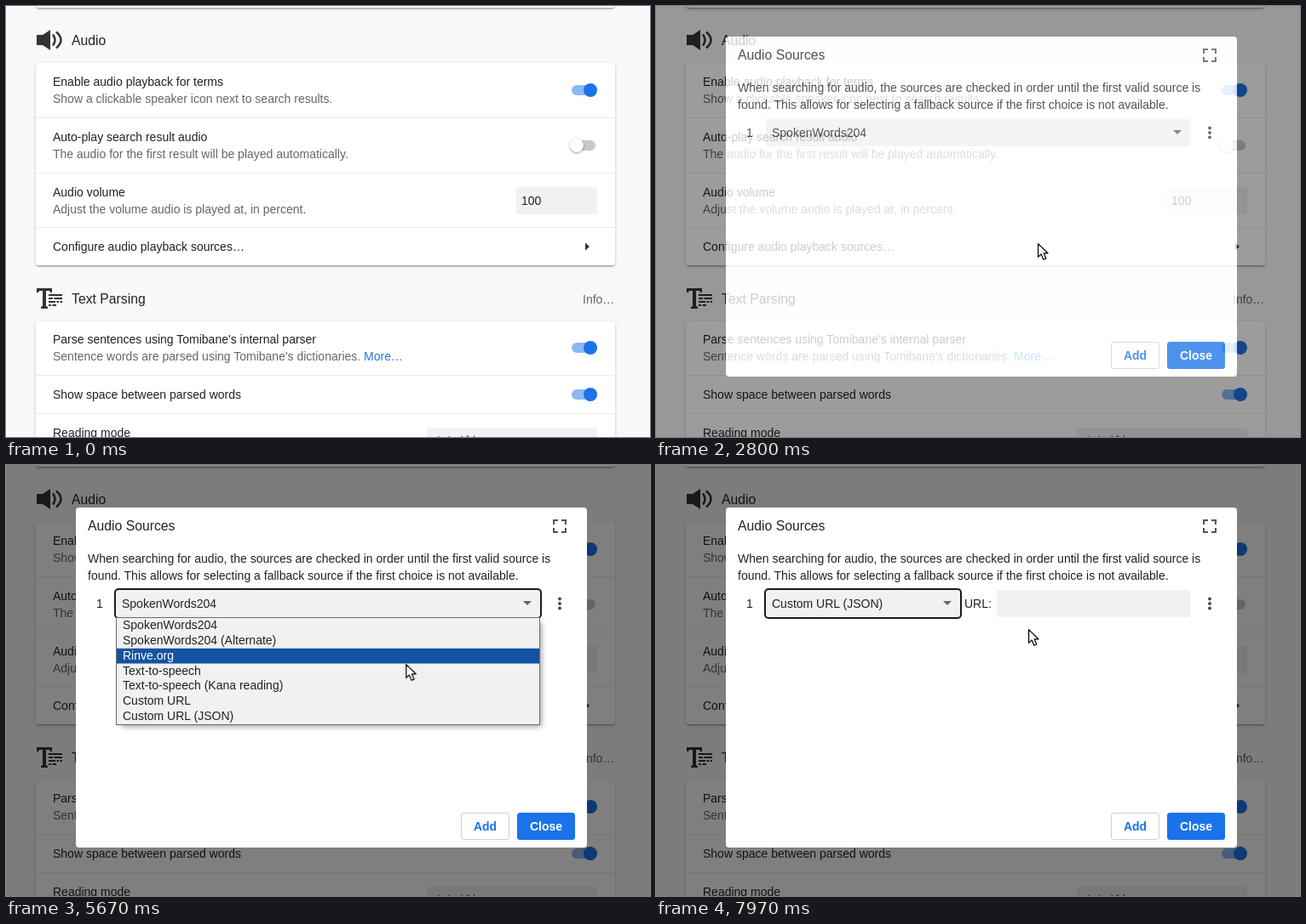
An HTML page for the animation above (8 s loop, 756 by 507 pixels).

```html
<!DOCTYPE html>
<html lang="en">
<head>
<meta charset="utf-8">
<title>Audio settings</title>
<style>
:root { --accent: #1a73e8; --text: #222; --soft: #666; --field: #f1f1f1; }
html, body { margin: 0; width: 100%; height: 100%; overflow: hidden; }
body {
  position: relative; background: #f8f9fb; color: var(--text);
  font: 14px/20px "Liberation Sans", Arial, sans-serif;
}
div, p, h2, svg, pre, i { position: absolute; margin: 0; box-sizing: border-box; }
p, h2, pre { white-space: pre; }
h2 { font-size: 15.75px; font-weight: 400; line-height: 21px; }
.soft { color: var(--soft); }
.link { color: #1f76dc; }
.layer { inset: 0; }
svg.layer { width: 756px; height: 507px; overflow: visible; }

.card {
  left: 35px; width: 680px; background: #fff; border-radius: 4px;
  box-shadow: 0 2px 2px rgba(0,0,0,.14), 0 3px 1px -2px rgba(0,0,0,.2), 0 1px 5px rgba(0,0,0,.12);
}
.line { left: 35px; width: 680px; height: 1px; background: #ebebeb; }
.field { background: var(--field); border-radius: 3px; height: 32px; }

.toggle { left: 664px; width: 28px; height: 12px; border-radius: 6px; background: #8cb9f3; }
.toggle::after {
  content: ""; position: absolute; left: 14px; top: -2px; width: 16px; height: 16px;
  border-radius: 50%; background: var(--accent);
}
.toggle.off { background: #c8c8c8; }
.toggle.off::after { left: -2px; background: #fff; box-shadow: 0 1px 3px rgba(0,0,0,.4); }

/* every animation shares one 8 s clock */
.hover, .chevron, .shade, .modal, .menu, .picked, .pick, .before, .after, .cursor, .arrow, .hand {
  animation: 8s infinite step-end;
}
.hover {
  left: 35px; top: 261px; width: 680px; height: 44px; border-radius: 0 0 4px 4px;
  background: #f8f9fa; opacity: 0; animation-name: hover;
}
@keyframes hover { 14.625% { opacity: 1 } 33.75%, 100% { opacity: 0 } }
.chevron { fill: #333; animation-name: chevron; }
@keyframes chevron { 14.625% { fill: #1a73e8 } 33.75%, 100% { fill: #333 } }

.shade { background: rgba(0,0,0,.5); opacity: 0; animation-name: fade; }
@keyframes fade {
  0% { opacity: 0 }
  33.33% { opacity: .104; animation-timing-function: steps(4, end) }
  35% { opacity: .78 }
  35.416% { opacity: .95 }
  35.83%, 100% { opacity: 1 }
}
.modal {
  left: 82px; top: 50px; width: 600px; height: 400px;
  background: #fff; border-radius: 4px; animation-name: drop;
}
@keyframes drop {
  0% { transform: translateY(-64px) }
  33.33% { transform: translateY(-57.5px); animation-timing-function: steps(4, end) }
  35% { transform: translateY(-14px) }
  35.416% { transform: translateY(-3px) }
  35.83%, 100% { transform: none }
}
.button {
  top: 359px; height: 32px; border-radius: 3px; border: 1px solid #d0d0d0;
  font-weight: 700; line-height: 30px; text-align: center; color: var(--accent);
}
.button.main { background: var(--accent); border-color: var(--accent); color: #fff; }

.pick { left: 47px; top: 97px; width: 498px; animation-name: pick; }
@keyframes pick {
  0% { box-shadow: none }
  57.125% { box-shadow: 0 0 0 1px #dcdcdc }
  57.5% { box-shadow: 0 0 0 1.5px #777 }
  57.875% { box-shadow: 0 0 0 2px #1c1c1c; width: 498px }
  90.875%, 100% { box-shadow: 0 0 0 2px #1c1c1c; width: 228px }
}
.pick::after {
  content: ""; position: absolute; right: 10px; top: 13px;
  border: 5px solid transparent; border-top-color: #666; border-bottom: 0;
}
.before { animation-name: before; }
.after { animation-name: after; opacity: 0; }
@keyframes before { 0% { opacity: 1 } 90.875%, 100% { opacity: 0 } }
@keyframes after { 0% { opacity: 0 } 90.875%, 100% { opacity: 1 } }

.menu {
  left: 47px; top: 129px; width: 498px; height: 127px;
  background: var(--field); border: 1px solid #6c6c6c; opacity: 0;
  box-shadow: 4px 4px 6px -2px rgba(0,0,0,.35); animation-name: menu;
}
@keyframes menu { 57.125% { opacity: 1 } 90.875%, 100% { opacity: 0 } }
.menu pre { inset: 0; padding-left: 7px; font: inherit; line-height: 17.857px; }
.menu .picked {
  --k: 0; background: #1553a0; color: #fff; animation-name: picked;
  clip-path: inset(calc(var(--k) * 17.857px) 0 calc((6 - var(--k)) * 17.857px));
}
@keyframes picked {
  0% { --k: 0 } 67.58% { --k: 1 } 69.24% { --k: 2 } 70.9% { --k: 3 }
  72.58% { --k: 4 } 74.1% { --k: 5 } 77.5%, 100% { --k: 6 }
}

.cursor { left: 0; top: 0; width: 1px; height: 1px; overflow: visible; animation-name: move; }
.cursor path { fill: #fff; stroke: #000; stroke-width: 1.2; stroke-linejoin: round; }
@keyframes move {
  0% { transform: translate(-40px, 115px) }
  4.125% { transform: translate(31px, 129px); animation-timing-function: cubic-bezier(.2, .55, .4, 1) }
  10.875% { transform: translate(457px, 218px) }
  14.625% { transform: translate(457px, 284px) }
  18.75% { transform: translate(455px, 284px); animation-timing-function: linear }
  20.4% { transform: translate(446px, 287px); animation-timing-function: linear }
  22% { transform: translate(437px, 279px); animation-timing-function: linear }
  23.6% { transform: translate(440px, 269px); animation-timing-function: linear }
  25.375% { transform: translate(448px, 279px) }
  45.375% { transform: translate(475px, 232px) }
  46.625% { transform: translate(490px, 209px) }
  48.375% { transform: translate(500px, 195px) }
  50% { transform: translate(515px, 175px) }
  51.625% { transform: translate(526px, 161px) }
  64.125% { transform: translate(526px, 161px); animation-timing-function: linear }
  74.125% { transform: translate(442px, 269px) }
  74.625% { transform: translate(436px, 276px) }
  75% { transform: translate(431px, 281px) }
  77.5% { transform: translate(426px, 286px) }
  80% { transform: translate(426px, 286px); animation-timing-function: linear }
  82.5% { transform: translate(431px, 292px); animation-timing-function: linear }
  85% { transform: translate(426px, 289px) }
  95% { transform: translate(426px, 289px); animation-timing-function: ease-in-out }
  99.6%, 100% { transform: translate(437px, 193px) }
}
.arrow { animation-name: arrow; }
.hand { animation-name: hand; }
@keyframes arrow {
  0% { opacity: 0 } 4.125% { opacity: 1 } 14.625% { opacity: 0 } 33.33% { opacity: 1 }
  50% { opacity: 0 } 65.9%, 100% { opacity: 1 }
}
@keyframes hand {
  0% { opacity: 0 } 14.625% { opacity: 1 } 33.33% { opacity: 0 }
  50% { opacity: 1 } 65.9%, 100% { opacity: 0 }
}
</style>
</head>
<body>
<div class="card" style="top:-50px;height:52px"></div>
<div class="card" style="top:67px;height:238px"></div>
<div class="card" style="top:371px;height:200px"></div>
<div class="hover"></div>
<div class="line" style="top:131px"></div>
<div class="line" style="top:196px"></div>
<div class="line" style="top:260px"></div>
<div class="line" style="top:434px"></div>
<div class="line" style="top:479px"></div>

<svg class="layer">
  <g fill="#333">
    <path d="M36 34h7l9-6v24l-9-6h-7z"/>
    <path d="M55 33.5q5 6.500 0 13" fill="none" stroke="#333" stroke-width="2.500"/>
    <path d="M59 30.500q11 9.500 0 19" fill="none" stroke="#333" stroke-width="2.500"/>
    <path d="M36 332h18v5h-2l-1-2h-4v18l2 1v2h-8v-2l2-1v-18h-4l-1 2h-2z"/>
    <path d="M50 339h16v2h-16zM50 343h5v2h-5zM56.500 343h9.500v2h-9.500zM50 347h8v2h-8zM59.500 347h2.500v2h-2.500zM63.500 347h2.500v2h-2.500zM50 351h3v2h-3zM54.500 351h4.500v2h-4.500z"/>
  </g>
  <path class="chevron" d="M680 278.500l5 4.500-5 4.500z"/>
</svg>

<h2 style="left:77px;top:30px">Audio</h2>
<p style="left:55px;top:79px">Enable audio playback for terms</p>
<p class="soft" style="left:55px;top:99px">Show a clickable speaker icon next to search results.</p>
<div class="toggle" style="top:93px"></div>
<p style="left:55px;top:144px">Auto-play search result audio</p>
<p class="soft" style="left:55px;top:164px">The audio for the first result will be played automatically.</p>
<div class="toggle off" style="top:158px"></div>
<p style="left:55px;top:209px">Audio volume</p>
<p class="soft" style="left:55px;top:229px">Adjust the volume audio is played at, in percent.</p>
<div class="field" style="left:599px;top:213px;width:95px"></div>
<p style="left:605px;top:219px">100</p>
<p style="left:55px;top:273px">Configure audio playback sources…</p>

<h2 style="left:77px;top:334px">Text Parsing</h2>
<p class="soft" style="left:677px;top:335px">Info…</p>
<p style="left:55px;top:382px">Parse sentences using Tomibane's internal parser</p>
<p class="soft" style="left:55px;top:402px">Sentence words are parsed using Tomibane's dictionaries. <span class="link">More…</span></p>
<div class="toggle" style="top:396px"></div>
<p style="left:55px;top:447px">Show space between parsed words</p>
<div class="toggle" style="top:451px"></div>
<p style="left:55px;top:492px">Reading mode</p>
<div class="field" style="left:494px;top:496px;width:200px"></div>
<p lang="ja" style="left:502px;top:502px;font-family:'Liberation Sans','Noto Sans CJK JP',sans-serif">ふりがな</p>

<div class="layer shade">
  <div class="modal">
    <h2 style="left:14px;top:11px">Audio Sources</h2>
    <p style="left:14px;top:50px">When searching for audio, the sources are checked in order until the first valid source is
found. This allows for selecting a fallback source if the first choice is not available.</p>
    <svg class="layer" style="width:600px;height:400px">
      <path d="M561 19v-4h4M571 15h4v4M575 25v4h-4M565 29h-4v-4" fill="none" stroke="#555" stroke-width="2" stroke-linecap="square"/>
      <g fill="#444"><circle cx="568" cy="107.500" r="1.900"/><circle cx="568" cy="113" r="1.900"/><circle cx="568" cy="118.500" r="1.900"/></g>
    </svg>
    <p style="left:24px;top:103px">1</p>
    <div class="field pick"></div>
    <p class="before" style="left:54px;top:103px">SpokenWords204</p>
    <div class="after layer">
      <p style="left:54px;top:103px">Custom URL (JSON)</p>
      <p style="left:280px;top:103px">URL:</p>
      <div class="field" style="left:318px;top:97px;width:227px"></div>
    </div>
    <div class="button" style="left:452px;width:57px">Add</div>
    <div class="button main" style="left:518px;width:68px">Close</div>
    <div class="menu"><pre>SpokenWords204
SpokenWords204 (Alternate)
Rinve.org
Text-to-speech
Text-to-speech (Kana reading)
Custom URL
Custom URL (JSON)</pre><pre class="picked"></pre></div>
  </div>
</div>

<svg class="cursor">
  <path class="arrow" d="M.6 .6V16.300L4.200 12.900 6.900 19.200 9.900 17.900 7.200 11.800H12z"/>
  <path class="hand" d="M-1.800 1.800Q0 -.8 1.700 1.800V6Q3.800 4.900 4.900 6.400 6.800 5.600 7.600 7.200 9.900 6.800 9.900 9.200V12.500L8.400 16.400H-.6L-5.400 10Q-5.400 7.600-3.400 8.200L-1.800 9.800z"/>
</svg>

<script>
const [plain, picked] = document.querySelectorAll(".menu pre");
picked.textContent = plain.textContent;
</script>
</body>
</html>
```
